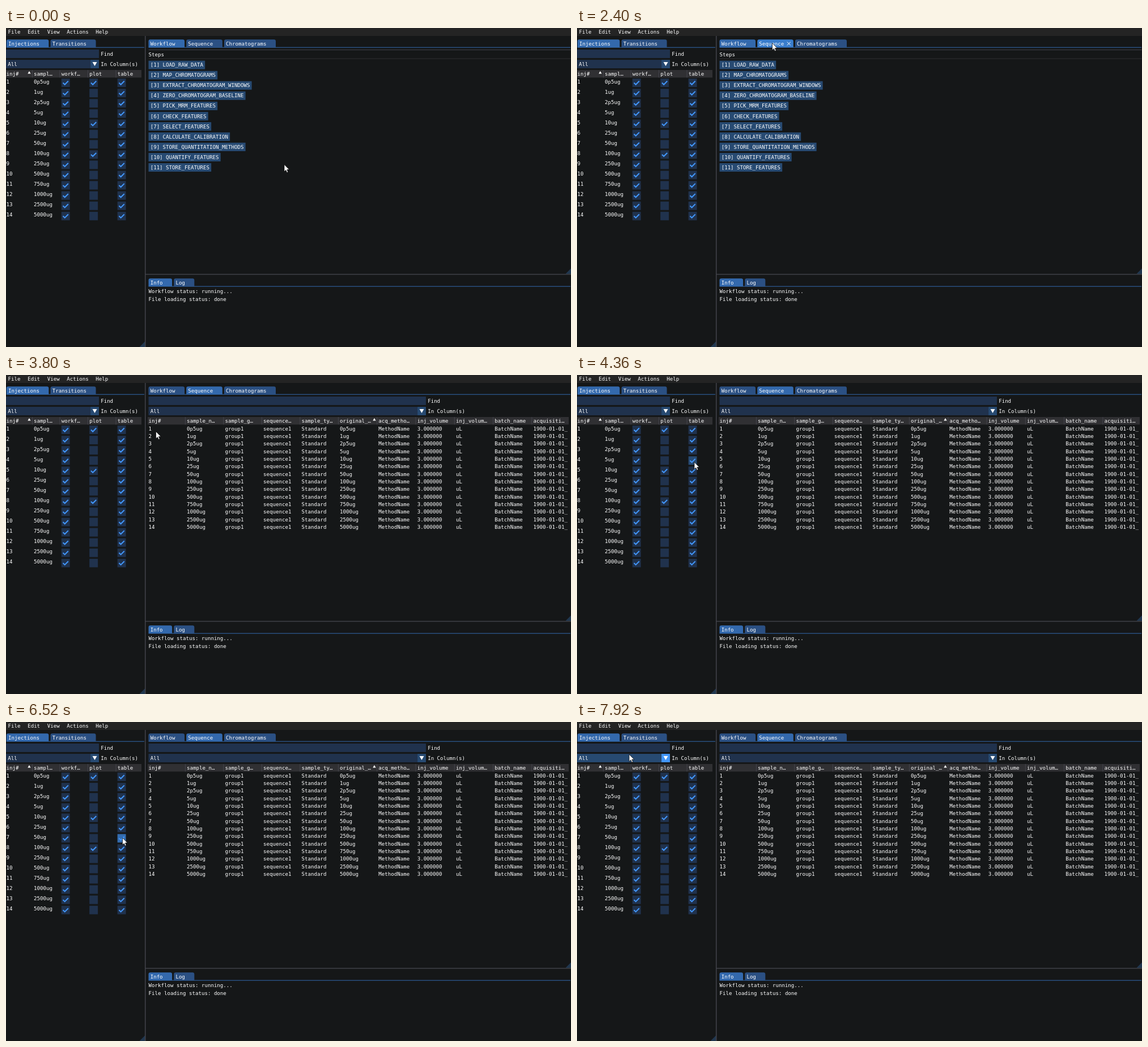
Recreate the animation shown at these times as an HTML page with a canvas. Size 997x562 px, loop 7990 ms.

```html
<!DOCTYPE html>
<html lang="en">
<head>
<meta charset="utf-8">
<title>Workflow and sequence panels</title>
<style>
html, body { margin: 0; width: 100%; height: 100%; overflow: hidden; background: #151718; }
canvas { display: block; }
</style>
</head>
<body>
<canvas id="stage" width="997" height="562"></canvas>
<script>
const ctx = document.getElementById('stage').getContext('2d');
const LOOP = 7990, TICK = 76.9;
const SCALE = 0.785;   // interface zoom; every size below derives from it
const CHAR = 7 * SCALE, BOX = 19 * SCALE, ROW = 23 * SCALE, LINE = 17 * SCALE, GAP = 4 * SCALE;
const MAIN = 251.5;    // left edge of the main panel's content

const C = {
  bg: '#151718', menu: '#242424', line: '#42434b', header: '#303033', divider: '#45454d',
  frame: '#20324d', button: '#274a72', active: '#336caf', accent: '#4296fa',
  tab: '#2b5083', tabOn: '#3369ad', tabHover: '#397dcd', grip: '#20374f', text: '#fff'
};

const STEPS = ['LOAD_RAW_DATA', 'MAP_CHROMATOGRAMS', 'EXTRACT_CHROMATOGRAM_WINDOWS',
  'ZERO_CHROMATOGRAM_BASELINE', 'PICK_MRM_FEATURES', 'CHECK_FEATURES', 'SELECT_FEATURES',
  'CALCULATE_CALIBRATION', 'STORE_QUANTITATION_METHODS', 'QUANTIFY_FEATURES', 'STORE_FEATURES'];
const SAMPLES = ['0p5', '1', '2p5', '5', '10', '25', '50', '100', '250', '500', '750',
  '1000', '2500', '5000'].map(s => s + 'ug');
const PLOTTED = [1, 5, 8];
const INJECTION_HEADS = ['inj#', 'sampl…', 'workf…', 'plot', 'table'];
const SEQUENCE_HEADS = ['inj#', 'sample_n…', 'sample_g…', 'sequence…', 'sample_ty…', 'original_…',
  'acq_metho…', 'inj_volume', 'inj_volum…', 'batch_name', 'acquisiti…'];

// Cursor key points: [tick, x, y]
const PATH = [
  [13, 491, 240.5], [20, 385, 100], [21, 362, 71.5], [24, 355, 50], [28, 345, 19],
  [31, 344.5, 26.5], [43, 344.5, 26.5], [49, 264.5, 99.5], [54, 218, 151],
  [56, 207, 153.5], [75, 207, 153.5], [85, 205.5, 204], [96, 205.5, 204], [103, 92, 57]
];
// Two clicks on a row's checkbox: off, then on again
const TOGGLES = [{ id: 4, off: 5060, on: 5600 }, { id: 7, off: 6600, on: 7060 }];
const PRESS = 85;

// Widths are whole units; the columns after the first few are one unit wider
const injectionCol = i => 0.4 + SCALE * (62 * i + Math.max(0, i - 2));
const sequenceCol = i => MAIN + SCALE * (86 * i + Math.max(0, i - 5));

const inside = ([px, py], x, y, w, h) => px > x && px < x + w && py > y && py < y + h;

function cursorAt(tick) {
  const i = PATH.findIndex(p => p[0] >= tick);
  if (i < 1) return (i ? PATH[PATH.length - 1] : PATH[0]).slice(1);
  const [a, b] = [PATH[i - 1], PATH[i]];
  const u = (tick - a[0]) / (b[0] - a[0]), ease = u * u * (3 - 2 * u);
  return [1, 2].map(k => a[k] + (b[k] - a[k]) * ease);
}

function rect(x, y, w, h, color) {
  ctx.fillStyle = color;
  ctx.fillRect(x, y, w, h);
}

function text(str, x, y) {
  ctx.save();
  ctx.translate(x, y + 3.2);
  ctx.scale(SCALE, SCALE);
  ctx.font = '11.63px "DejaVu Sans Mono", monospace';
  ctx.fillStyle = C.text;
  ctx.fillText(str, 0, 0);
  ctx.restore();
}

function polygon(points, color) {
  ctx.beginPath();
  points.forEach(p => ctx.lineTo(...p));
  ctx.closePath();
  ctx.fillStyle = color;
  ctx.fill();
}

function grip(x, y) {
  polygon([[x, y - 9.5], [x, y], [x - 9.5, y]], C.grip);
}

function cross(x, y, r) {
  ctx.beginPath();
  for (const s of [-1, 1]) {
    ctx.moveTo(x - r, y - r * s);
    ctx.lineTo(x + r, y + r * s);
  }
  ctx.strokeStyle = C.text;
  ctx.lineWidth = 1;
  ctx.stroke();
}

function tabBar(labels, x, right, bottom, selected, pointer) {
  rect(x, bottom - 0.3, right - x, 1, C.tabOn);
  labels.forEach((label, i) => {
    const w = label.length * CHAR + 25 * SCALE, h = 13.7;
    const hover = inside(pointer, x, bottom - h, w, h);
    ctx.beginPath();
    ctx.roundRect(x, bottom - h, w, h, [GAP, GAP, 0, 0]);
    ctx.fillStyle = hover ? C.tabHover : i === selected ? C.tabOn : C.tab;
    ctx.fill();
    text(label, x + GAP, bottom - 6.5);
    if (hover) cross(x + w - 8, bottom - 6.5, 3);
    x += w + GAP;
  });
}

function filter(x, right, pointer) {
  const y = 38, combo = y + ROW, mid = right - BOX / 2;
  const hover = inside(pointer, x, combo, right - x, BOX);
  rect(x, y, right - x, BOX, C.frame);
  text('Find', right + GAP, y + BOX / 2);
  rect(x, combo, right - x - BOX, BOX, hover ? C.button : C.frame);
  rect(right - BOX, combo, BOX, BOX, hover ? C.accent : C.button);
  polygon([[mid - 4, combo + 4], [mid + 4, combo + 4], [mid, combo + 11]], C.text);
  text('All', x + GAP, combo + BOX / 2);
  text('In Column(s)', right + GAP, combo + BOX / 2);
}

function tableHeader(heads, column, x, right, sortX) {
  rect(x, 74, right - x, LINE, C.header);
  heads.forEach((head, i) => {
    if (i) rect(column(i) - GAP, 74, 1, LINE, C.divider);
    text(head, column(i), 81);
  });
  polygon([[sortX - 2.7, 80.5], [sortX + 2.7, 80.5], [sortX, 76]], C.text);
}

function checkbox(x, y, checked, color) {
  rect(x, y, BOX, BOX, color);
  if (!checked) return;
  ctx.beginPath();
  ctx.lineTo(x + BOX * 0.19, y + BOX * 0.5);
  ctx.lineTo(x + BOX * 0.4, y + BOX * 0.71);
  ctx.lineTo(x + BOX * 0.81, y + BOX * 0.3);
  ctx.strokeStyle = C.accent;
  ctx.lineWidth = 2.6 * SCALE;
  ctx.stroke();
}

function drawInjections(pointer, hidden, pressed) {
  tabBar(['Injections', 'Transitions'], 0.8, 244, 34, 0, pointer);
  filter(0, 164, pointer);
  tableHeader(INJECTION_HEADS, injectionCol, 0, 239, 41);
  SAMPLES.forEach((name, i) => {
    const id = i + 1, y = 89.1 + ROW * i;
    text(id, injectionCol(0), y + 5.4);
    text(name, injectionCol(1), y + 5.4);
    [true, PLOTTED.includes(id), id !== hidden].forEach((checked, k) => {
      const x = injectionCol(k + 2);
      const hover = inside(pointer, x, y, BOX * 1.5, BOX);
      checkbox(x, y, checked, hover ? (pressed ? C.active : C.button) : C.frame);
    });
  });
  grip(245, 562);
}

function drawWorkflow(pointer) {
  rect(MAIN, 38, 745, 1, C.line);
  text('Steps', MAIN, 46.5);
  rect(MAIN, 53.5, 745, 1, C.header);
  STEPS.forEach((step, i) => {
    const label = `[${i + 1}] ${step}`, y = 57.6 + ROW * i;
    const w = label.length * CHAR + 2 * GAP;
    rect(MAIN, y, w, BOX, inside(pointer, MAIN, y, w, BOX) ? C.accent : C.button);
    text(label, MAIN + GAP, y + BOX / 2);
  });
}

function drawSequence(pointer, hidden) {
  filter(MAIN, 741, pointer);
  tableHeader(SEQUENCE_HEADS, sequenceCol, 250, 993, 650);
  SAMPLES.map((name, i) => [i + 1, name, 'group1', 'sequence1', 'Standard', name,
    'MethodName', '3.000000', 'uL', 'BatchName', '1900-01-01_'])
    .filter(([id]) => id !== hidden)
    .forEach((row, r) => row.forEach((cell, i) => text(cell, sequenceCol(i), 94.4 + LINE * r)));
}

function drawInfo(pointer) {
  tabBar(['Info', 'Log'], MAIN, 996, 455, 0, pointer);
  text('Workflow status: running...', MAIN, 464);
  text('File loading status: done', MAIN, 464 + LINE);
}

function drawMenu() {
  rect(0, 0, 997, 14, C.menu);
  let x = 3.6;
  for (const item of ['File', 'Edit', 'View', 'Actions', 'Help']) {
    text(item, x, 7);
    x += item.length * CHAR + 4 * GAP;
  }
}

function drawCursor([x, y]) {
  const arrow = [[0, 0], [0, 16], [3.7, 12.6], [6, 18], [8.6, 17], [6.3, 11.5], [11.3, 11.5]];
  polygon(arrow.map(([px, py]) => [x + px * SCALE, y + py * SCALE]), C.text);
  ctx.strokeStyle = '#000';
  ctx.lineWidth = 0.7;
  ctx.stroke();
}

function draw(t) {
  const tick = Math.floor((t + 20) / TICK);
  const pointer = cursorAt(tick - 1);   // hover trails the visible cursor
  const hidden = TOGGLES.find(g => t >= g.off && t < g.on)?.id;
  const pressed = TOGGLES.some(g => [g.off, g.on].some(end => t >= end - PRESS && t < end));
  const sequence = t >= 2650;

  rect(0, 0, 997, 562, C.bg);
  drawMenu();
  rect(245, 14, 1.5, 548, C.line);
  rect(246, 433.3, 751, 1.4, C.line);
  drawInjections(pointer, hidden, pressed);
  tabBar(['Workflow', 'Sequence', 'Chromatograms'], MAIN, 996, 34, sequence ? 1 : 0, pointer);
  if (sequence) drawSequence(pointer, hidden);
  else drawWorkflow(pointer);
  grip(997, 433);
  drawInfo(pointer);
  drawCursor(cursorAt(tick));
}

function frame() {
  draw(performance.now() % LOOP);
  requestAnimationFrame(frame);
}
frame();
</script>
</body>
</html>
```
